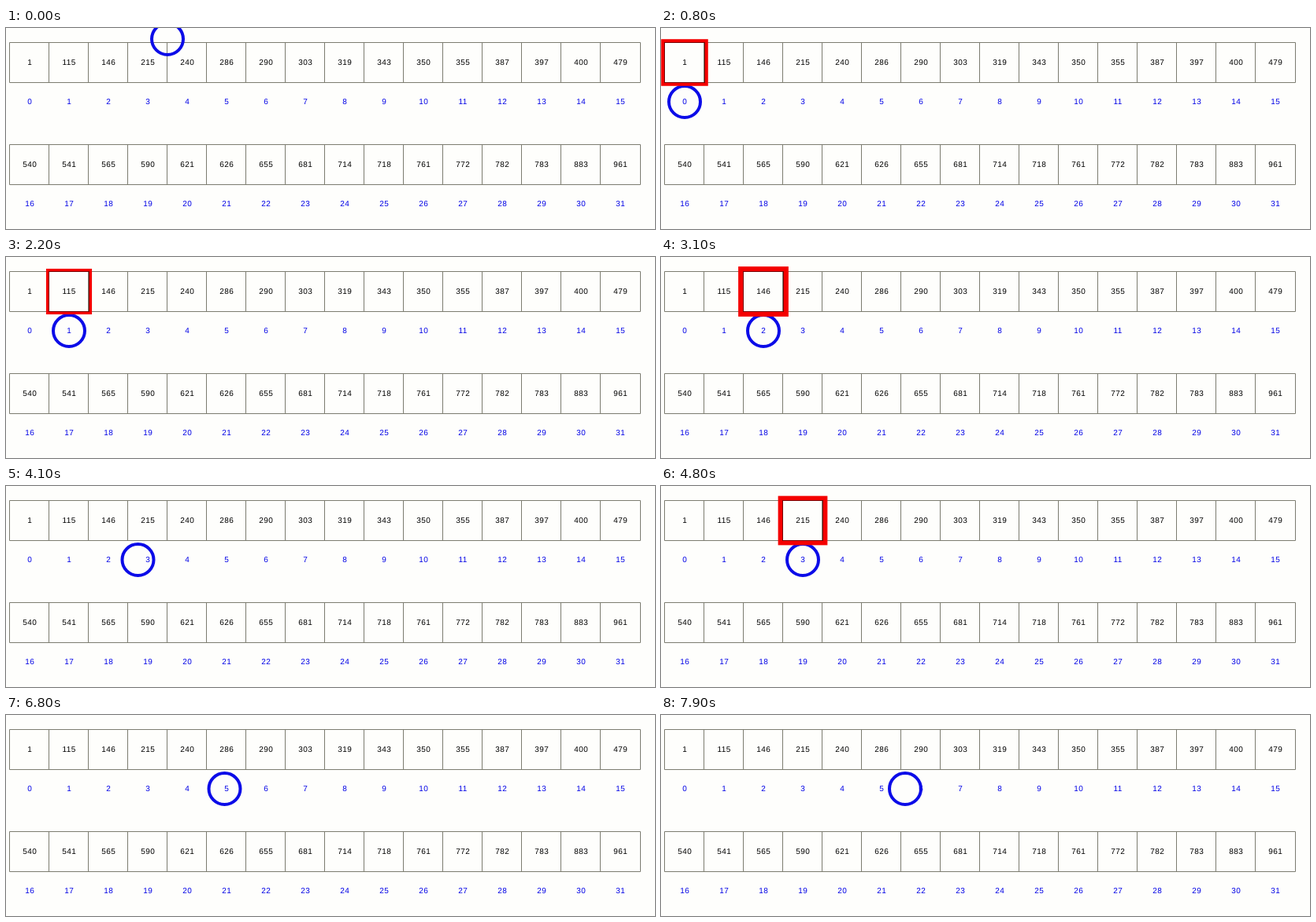
Write an HTML page that moves like this. It is 824x256 px and loops after 8000 ms.

```html
<!DOCTYPE html>
<html lang="en">
<head>
<meta charset="utf-8">
<title>Linear search</title>
<style>
  html, body { margin: 0; width: 100%; height: 100%; overflow: hidden; background: #fefefc; }
  svg { display: block; width: 824px; height: 256px; }
  text {
    font: 10px "Liberation Sans", Arial, sans-serif;
    letter-spacing: 0.4px;
    text-anchor: middle;
    text-rendering: geometricPrecision;
  }
  .value { fill: #000; }
  .index { fill: #0000e6; }
  .grid { fill: none; stroke: #7c7c70; }
  #ring { fill: none; stroke: #0c0ce8; stroke-width: 4; }
  #glow { fill: none; stroke: #f40000; }
  #edge { fill: none; stroke: #780000; }
</style>
</head>
<body>
<svg viewBox="0 0 824 256">
  <g id="array"></g>
  <circle id="ring" r="20"/>
  <g id="mark">
    <rect id="glow"/>
    <rect id="edge" y="18.5" width="51" height="51"/>
  </g>
</svg>
<script>
const values = [
  1, 115, 146, 215, 240, 286, 290, 303, 319, 343, 350, 355, 387, 397, 400, 479,
  540, 541, 565, 590, 621, 626, 655, 681, 714, 718, 761, 772, 782, 783, 883, 961
];
const CELL = 50, COLS = 16, LEFT = 30, TOP = 44, ROW = 130;
const LOOP = 8000, SAMPLE = 100;
const TICK = 32.5, STEPS = 20;        // one move or one highlight lasts 20 ticks
const MOVE_START = -318;              // the first move is already under way
const ENTRY = { x: 348.2, y: -51.5 };
const PULSE = 1820, PULSE_MIN = 510;

const byId = id => document.getElementById(id);
const [array, ring, mark, glow, edge] = ['array', 'ring', 'mark', 'glow', 'edge'].map(byId);

function add(tag, attrs, content = '') {
  const node = document.createElementNS('http://www.w3.org/2000/svg', tag);
  set(node, attrs);
  node.textContent = content;
  array.append(node);
}

function set(node, attrs) {
  for (const name in attrs) node.setAttribute(name, attrs[name]);
}

const centerX = i => LEFT + (i % COLS) * CELL;

function drawArray() {
  for (const y of [TOP, TOP + ROW]) {
    let path = `M4.5 ${y - 25.5}H805.5V${y + 25.5}H4.5Z`;
    for (let c = 1; c < COLS; c++) path += `M${4.5 + c * CELL} ${y - 25.5}v51`;
    add('path', { d: path, class: 'grid' });
  }
  values.forEach((value, i) => {
    const x = centerX(i) + 0.2, y = TOP + Math.floor(i / COLS) * ROW;
    add('text', { x, y: y + 3, class: 'value' }, value);
    add('text', { x, y: y + 53, class: 'index' }, i);
  });
}

function render(time) {
  const t = Math.floor((time % LOOP) / SAMPLE) * SAMPLE;
  const tick = Math.floor((t - MOVE_START) / TICK);
  const i = Math.floor(tick / (2 * STEPS));
  const p = Math.min(1, (tick % (2 * STEPS)) / STEPS);

  const to = { x: centerX(i), y: TOP + CELL };
  const from = i ? { x: centerX(i - 1), y: to.y } : ENTRY;
  set(ring, {
    cx: from.x + (to.x - from.x) * p,
    cy: from.y + (to.y - from.y) * p
  });

  const arrived = p === 1;
  mark.style.display = arrived ? '' : 'none';
  if (!arrived) return;

  // The frame swells from 3 to 7 px and back.
  const phase = ((t - PULSE_MIN + PULSE) % PULSE) / PULSE;
  const width = 3.5 + 4 * (1 - Math.abs(1 - 2 * phase));
  const size = CELL + width;
  set(glow, {
    x: to.x - size / 2, y: TOP - size / 2,
    width: size, height: size, 'stroke-width': width
  });
  set(edge, { x: to.x - 25.5 });
}

const start = performance.now();
function loop() {
  render(performance.now() - start);
  requestAnimationFrame(loop);
}

drawArray();
render(0);
requestAnimationFrame(loop);
</script>
</body>
</html>
```
